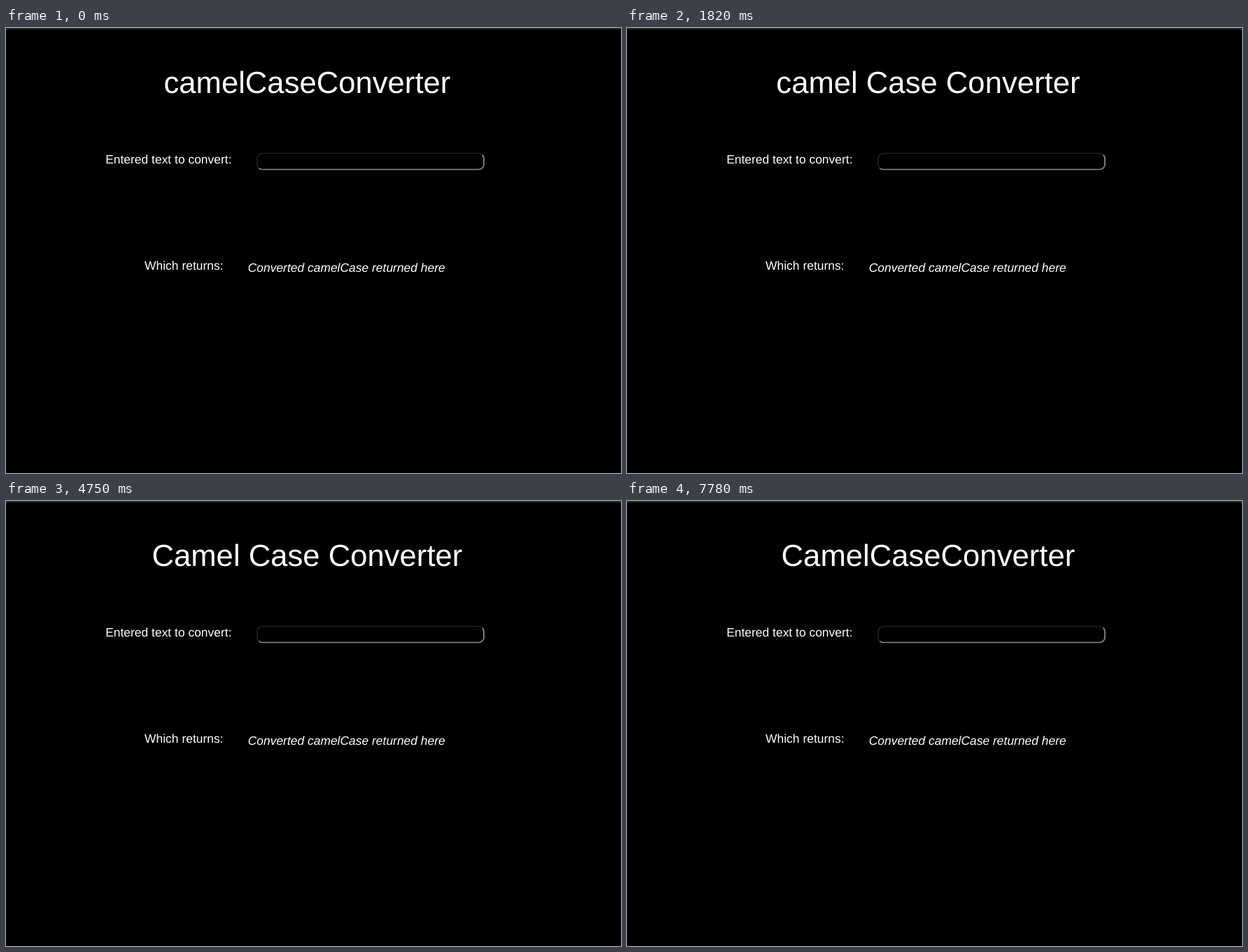
These frames come from a looping animation (879 by 637 pixels, 8 s). An HTML page:

```html
<!DOCTYPE html>
<html lang="en">
<head>
<meta charset="utf-8">
<title>Case converter</title>
<style>
  html, body {
    margin: 0;
    width: 100%;
    height: 100%;
    overflow: hidden;
    background: #000;
  }
  svg { display: block; }
  text {
    font: 17.46px "Liberation Sans", Arial, sans-serif;
    fill: #fff;
    text-rendering: geometricPrecision;
  }
  .hint { font-style: italic; }
  .titles text {
    font-size: 43.65px;
    text-anchor: middle;
  }
  /* Titles are stacked 100px apart; the strip jumps from one to the next. */
  .titles { animation: swap 8s step-end infinite; }
  @keyframes swap {
    0%      { transform: translateY(0); }
    0.25%   { transform: translateY(-100px); }
    22.375% { transform: translateY(-200px); }
    47.375% { transform: translateY(-300px); }
    72.25%  { transform: translateY(-400px); }
    97.25%  { transform: translateY(-500px); }
    100%    { transform: translateY(-500px); }
  }
  .edge { fill: none; stroke-width: 1.7; }
</style>
</head>
<body>
<svg width="879" height="637" viewBox="0 0 879 637">
  <rect width="879" height="2.4" fill="#24241c"/>

  <svg y="30" width="879" height="90" overflow="hidden">
    <g class="titles">
      <text x="430.4" y="63">camelCaseConverter</text>
      <text x="430.4" y="163">camel CaseConverter</text>
      <text x="430.4" y="263">camel Case Converter</text>
      <text x="430.4" y="363">Camel Case Converter</text>
      <text x="430.4" y="463">CamelCase Converter</text>
      <text x="430.4" y="563">CamelCaseConverter</text>
    </g>
  </svg>

  <text x="142.2" y="194">Entered text to convert:</text>
  <path class="edge" stroke="#22221a" d="M361.2 200.5A7.5 7.5 0 0 1 359 195V187A7.5 7.5 0 0 1 366.5 179.5H675.5A7.5 7.5 0 0 1 680.8 181.7"/>
  <path class="edge" stroke="#8c8c90" d="M680.8 181.7A7.5 7.5 0 0 1 683 187V195A7.5 7.5 0 0 1 675.5 202.5H366.5A7.5 7.5 0 0 1 361.2 200.5"/>

  <text x="198.1" y="346.3">Which returns:</text>
  <text class="hint" x="345.7" y="349">Converted camelCase returned here</text>
</svg>
</body>
</html>
```
